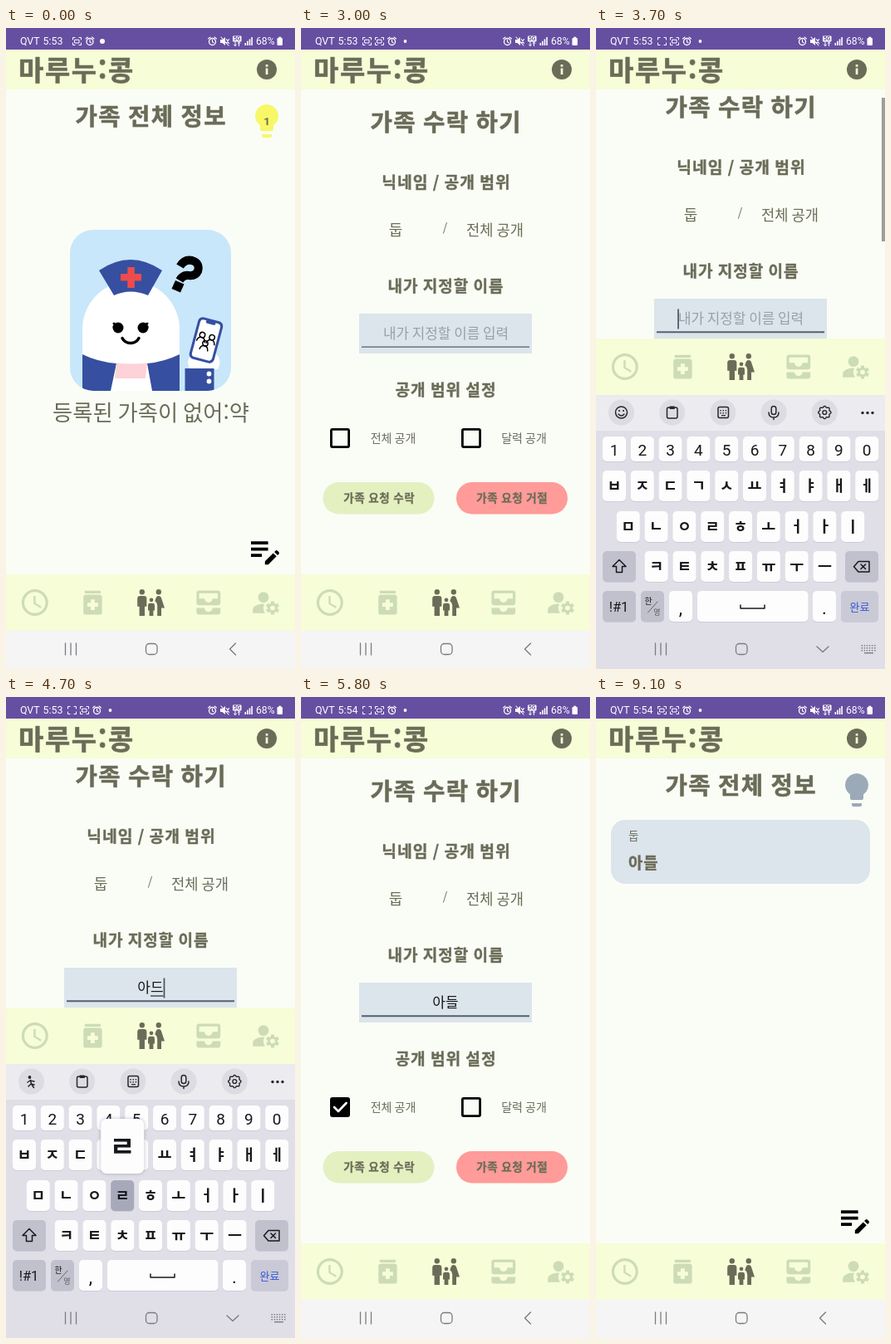
An HTML page with a canvas that plays this animation: 348 px wide and 772 px high, repeating every 9.2 s.

```html
<!DOCTYPE html>
<html lang="ko">
<head>
<meta charset="utf-8">
<title>가족 정보</title>
<style>
html, body { margin: 0; width: 100%; height: 100%; overflow: hidden; background: #fafdf6; }
canvas { display: block; width: 348px; height: 772px; }
</style>
</head>
<body>
<canvas id="stage"></canvas>
<script>
const W = 348, H = 772, LOOP = 9200, STEP = 100;
const KR = '"Noto Sans CJK KR", "Noto Sans CJK", sans-serif';
const LATIN = 'Roboto, "Noto Sans CJK KR", sans-serif';
const INK = '#6b6c58', PAGE = '#fafdf6', LIME = '#f6fdd7', PALE = '#cddcb6';
const FIELD = '#dce4ec', BLUE = '#364fa0', KEY_DARK = '#c0c1cd', KEY_INK = '#17181b';
const NAV_LIFT = 284;

const canvas = document.getElementById('stage');
const c = canvas.getContext('2d');
const ratio = window.devicePixelRatio || 1;
canvas.width = W * ratio;
canvas.height = H * ratio;

// ---------- helpers ----------
const clamp = v => Math.max(0, Math.min(1, v));
const easeOut = p => 1 - (1 - clamp(p)) ** 2;
const within = (t, a, b) => t >= a && t < b;

function rect(x, y, w, h, color, r = 0) {
  c.fillStyle = color;
  c.beginPath();
  c.roundRect(x, y, w, h, r);
  c.fill();
}
function dot(x, y, r, color) {
  c.fillStyle = color;
  c.beginPath();
  c.arc(x, y, r, 0, 7);
  c.fill();
}
function ring(x, y, r, color, width) {
  c.beginPath();
  c.arc(x, y, r, 0, 7);
  c.strokeStyle = color;
  c.lineWidth = width;
  c.stroke();
}
function line(d, color, width) {
  c.strokeStyle = color;
  c.lineWidth = width;
  c.stroke(new Path2D(d));
}
function fill(d, color) {
  c.fillStyle = color;
  c.fill(new Path2D(d));
}
function icon(d, x, y, scale, color) {
  c.save();
  c.translate(x, y);
  c.scale(scale, scale);
  c.fillStyle = color;
  c.fill(new Path2D(d), 'evenodd');
  c.restore();
}
function text(s, x, cy, size, color = INK, align = 'center', font = KR, weight = 400) {
  c.font = `${weight} ${size}px ${font}`;
  c.textAlign = align;
  c.fillStyle = color;
  c.fillText(s, x, cy + size * 0.35);
}
// heavy, rounded, slightly tracked lettering
function heavy(s, x, cy, size, align = 'center') {
  const em = size * 0.94, gap = em * 0.05;
  c.letterSpacing = `${gap}px`;
  const left = x + (align === 'center' ? gap / 2 : 0);
  text(s, left, cy, em, INK, align, KR, 700);
  c.strokeStyle = INK;
  c.lineWidth = em * 0.02;
  c.strokeText(s, left, cy + em * 0.35);
  c.letterSpacing = '0px';
}

// ---------- status bar ----------
function brackets(x, full) {
  line(`M${x} 14v-2.5h2.5M${x + 7.5} 11.5h2.5v2.5M${x + 10} 18v2.5h-2.5M${x + 2.5} 20.5h-2.5v-2.5`, '#fff', 1);
  if (full) {
    c.strokeStyle = '#fff';
    c.strokeRect(x + 2.5, 14.2, 5, 3.8);
  }
}
function alarm(x) {
  ring(x, 16.5, 4, '#fff', 1.3);
  line(`M${x} 14.3v2.5l1.6 1M${x - 5} 13l2.5-2M${x + 5} 13l-2.5-2`, '#fff', 1.1);
}
function statusBar(t) {
  rect(0, 0, W, 26, '#664fa1');
  text('QVT', 17, 16, 12.4, '#fff', 'left', LATIN);
  text(t < 5400 ? '5:53' : '5:54', 44.5, 16, 12.4, '#fff', 'left', LATIN);
  const blink = Math.floor(t / 500) % 2 === 0;
  if (t < 200) {
    brackets(80.5, blink);
    alarm(101);
    dot(116, 16, 3, '#fff');
  } else {
    brackets(74.5, blink);
    brackets(89.5, true);
    alarm(109.5);
    dot(125.5, 16, 1.9, '#fff');
  }
  alarm(248.5);
  fill('M258 14h2.5l3.5-3v10l-3.5-3H258z', '#fff');
  line('M265.5 13.5l3 5M268.5 13.5l-3 5M259 11l9 10', '#fff', 1.1);
  rect(273, 9.5, 10.5, 7, '#fff', 1);
  text('5G', 278.2, 13, 6.5, '#664fa1', 'center', LATIN, 700);
  c.globalAlpha = within(t, 7700, 8700) ? 0.45 : 1;
  line('M276 17v4.5M274.5 20l1.5 1.5 1.5-1.5M280.5 21.5v-4.5M279 18.5l1.5-1.5 1.5 1.5', '#fff', 1);
  c.globalAlpha = 1;
  for (let i = 0; i < 4; i++) rect(287.5 + i * 2.6, 18 - i * 2.3, 1.6, 3 + i * 2.3, '#fff');
  text('68%', 301, 16, 12.2, '#fff', 'left', LATIN);
  rect(326.5, 12, 6.5, 9, '#fff', 1.2);
  rect(328.3, 10.7, 3, 2, '#fff');
}

function header() {
  rect(0, 26, W, 48, LIME);
  heavy('마루누:콩', 15, 51, 35, 'left');
  dot(314, 50, 12, INK);
  rect(312.7, 48.5, 2.7, 7.5, LIME);
  rect(312.7, 44, 2.7, 2.7, LIME);
}

// ---------- bottom navigation ----------
const CLOCK = 'M12 2a10 10 0 1 0 0 20a10 10 0 1 0 0-20zM12 4a8 8 0 1 1 0 16a8 8 0 1 1 0-16zM11 7h1.5v5.25l4.5 2.67-.75 1.23L11 13z';
const PILLS = 'M6 3h12v2H6zM17 6H7a2 2 0 0 0-2 2v11a2 2 0 0 0 2 2h10a2 2 0 0 0 2-2V8a2 2 0 0 0-2-2zM16 15h-2.5v2.5h-3V15H8v-3h2.5V9.5h3V12H16z';
const FAMILY = 'M16 4a2 2 0 1 1 4 0a2 2 0 1 1-4 0zM20 22v-6h2.5l-2.54-7.63A2 2 0 0 0 18.06 7h-.12a2 2 0 0 0-1.9 1.37l-.86 2.58A3.5 3.5 0 0 1 17 14v8zM11 10a1.5 1.5 0 1 1 3 0a1.5 1.5 0 1 1-3 0zM3.5 4a2 2 0 1 1 4 0a2 2 0 1 1-4 0zM7.5 22v-7H9V9a2 2 0 0 0-2-2H4a2 2 0 0 0-2 2v6h1.5v7zM14 22v-4h1v-4a1.5 1.5 0 0 0-1.5-1.5h-2A1.5 1.5 0 0 0 10 14v4h1v4z';
const INBOX = 'M19 3H5a2 2 0 0 0-2 2v7a2 2 0 0 0 2 2h14a2 2 0 0 0 2-2V5a2 2 0 0 0-2-2zM19 9h-4a3 3 0 0 1-6 0H5V5h14zM15 16h6v3a2 2 0 0 1-2 2H5a2 2 0 0 1-2-2v-3h6a3 3 0 0 0 6 0z';
const PERSON = 'M6 8a4 4 0 1 1 8 0a4 4 0 1 1-8 0zM10.67 13.02C8 12.8 5.4 13.6 3.39 14.82A3 3 0 0 0 2 17.35V20h9.26A7 7 0 0 1 10.67 13.02z';
const BULB = 'M9 20h6v1a1 1 0 0 1-1 1h-4a1 1 0 0 1-1-1zM12 2a7 7 0 0 0-4 12.74V17a1 1 0 0 0 1 1h6a1 1 0 0 0 1-1v-2.26A7 7 0 0 0 12 2z';
const NOTE = 'M3 10h11v2H3zM3 6h11v2H3zM3 14h7v2H3zM18.01 12.87l.71-.71a1 1 0 0 1 1.41 0l.71.71a1 1 0 0 1 0 1.41l-.71.71zM17.3 13.58l-5.3 5.3V21h2.12l5.3-5.3z';

function gear(x, y) {
  c.save();
  c.translate(x, y);
  c.fillStyle = PALE;
  for (let i = 0; i < 6; i++) {
    c.fillRect(-2, -8, 4, 5);
    c.rotate(Math.PI / 3);
  }
  c.restore();
  ring(x, y, 4.5, PALE, 3);
}
function bottomNav(dy) {
  c.save();
  c.translate(0, dy);
  rect(0, 658, W, 68, LIME);
  icon(CLOCK, 15.6, 672.8, 1.6, PALE);
  icon(PILLS, 85.2, 673, 1.6, PALE);
  icon(FAMILY, 155, 672.8, 1.6, INK);
  icon(INBOX, 224.6, 672.8, 1.6, PALE);
  icon(PERSON, 294, 672.8, 1.6, PALE);
  gear(321, 698.5);
  c.restore();
}
function systemBar(k) {
  const open = k > 0.5, gray = '#7b7c80';
  rect(0, 725.5, W, 46.5, open ? '#e0dfe7' : '#f5f5f5');
  line('M71.5 741v14M78 741v14M84.5 741v14', gray, 1.3);
  c.beginPath();
  c.roundRect(168.5, 741.5, 13.5, 13, 4);
  c.stroke();
  line(open ? 'M266 745l7 6.5 7-6.5' : 'M276.5 741l-7 7 7 7', gray, 1.4);
  if (!open) return;
  for (let i = 0; i < 18; i++) rect(319.5 + (i % 6) * 3.1, 743 + Math.floor(i / 6) * 3, 1.5, 1.5, gray);
  rect(323, 752, 11, 1.4, gray);
}

// ---------- family page ----------
function nurse() {
  c.save();
  c.beginPath();
  c.roundRect(77, 243, 194, 194, 28);
  c.clip();
  rect(77, 243, 194, 194, '#c8e7fa');
  fill('M92 437V363a58.5 58.5 0 0 1 117 0V437z', '#fff');
  fill('M92 393Q110 402 133 404L126 437H92zM209 393Q191 402 170 404L176 437H209z', BLUE);
  fill('M133 403.5Q151 405.5 170 403.5L168 422H131z', '#fdd2d8');
  fill('M112 292Q150 266 188 292L171 322Q150 313 130 322z', BLUE);
  rect(138, 296, 25, 8.5, '#ee4b4b');
  rect(146.3, 288, 8.5, 25, '#ee4b4b');
  dot(135, 361, 6.5, '#000');
  dot(165, 361, 6.5, '#000');
  line('M130 356l2 2M130 360l1 1M170 356l-2 2M170 360l-1 1', '#000', 3);
  line('M140 373.5Q143 379.5 150 379.5Q157 379.5 160 373.5', '#000', 3.5);
  // question mark
  c.lineCap = 'butt';
  line('M209.5 287Q215 278 224 280Q234 283 231 293Q228 299 220 298Q213 297 209 304', '#000', 10);
  fill('M204 304l10.5 4.5-4.5 10-10.5-4.5z', '#000');
  c.lineCap = 'round';
  // arm and phone
  fill('M221 411Q215 396 228 392L252 391Q261 400 255 411z', '#fff');
  rect(215.5, 410, 35, 27, BLUE);
  dot(244.5, 416.5, 2.9, '#fff');
  dot(244.5, 425.5, 2.9, '#fff');
  c.translate(241, 376);
  c.rotate(0.26);
  rect(-15.5, -26, 31, 52, BLUE, 6);
  rect(-12.5, -23, 25, 46, '#fff', 4);
  rect(-6, -24, 12, 4, BLUE, 2);
  for (const [x, y] of [[-6, -5], [6, -5], [0, 4]]) {
    ring(x, y, 3.2, '#000', 1.5);
    line(`M${x - 5} ${y + 8}q1-5 5-5t5 5`, '#000', 1.5);
  }
  c.restore();
}
function familyPage(registered) {
  rect(0, 74, W, 584, PAGE);
  heavy('가족 전체 정보', 174, 107, 30.5);
  icon(BULB, 290, 88, 2, registered ? '#9ca9b9' : '#f8f766');
  icon(NOTE, 289.4, 607, 1.87, '#000');
  if (registered) {
    rect(18, 148, 312, 77, FIELD, 17);
    text('둡', 39, 167, 13.5, INK, 'left');
    heavy('아들', 39, 200, 20, 'left');
  } else {
    text('1', 314, 112.5, 13.5, INK, 'center', LATIN, 700);
    nurse();
    text('등록된 가족이 없어:약', 174.5, 464, 26.3);
  }
}

// ---------- request page ----------
const PRESSES = [['ㅇ', 3800], ['ㅏ', 4100], ['ㄷ', 4300], ['ㅡ', 4500], ['ㄹ', 4700]];
const TYPED = ['', 'ㅇ', '아', '앋', '아드', '아들'];

function checkbox(x, y, on) {
  if (on) {
    rect(x, y, 24, 24, '#000', 3);
    line(`M${x + 5} ${y + 12}l5 5 9.5-10`, '#fff', 2.6);
  } else {
    c.strokeStyle = '#000';
    c.lineWidth = 2.8;
    c.beginPath();
    c.roundRect(x + 1.4, y + 1.4, 21.2, 21.2, 1.5);
    c.stroke();
  }
}
function nameField(t) {
  const focused = t >= 3400;
  const count = PRESSES.filter(p => t >= p[1] + STEP).length;
  const value = TYPED[count];
  rect(70, 344, 208, 48, FIELD);
  rect(73, focused ? 383.3 : 383.6, 202, focused ? 2 : 1.1, '#55606f');
  if (value) text(value, 174, 368.5, 17, '#15171a');
  else text('내가 지정할 이름 입력', 174.5, 368.5, 16.9, '#98a1aa');
  if (!within(t, 3500, 5300)) return;
  const half = value ? c.measureText(value).width / 2 : 75;
  if (value) {
    const last = c.measureText(value.slice(-1)).width;
    rect(174 + half - last, 377.5, last, 1.1, '#15171a');
  }
  rect(value ? 174 + half : 98.2, 356.5, 1.7, 24, '#4a5260');
}
function requestPage(t, k) {
  rect(0, 74, W, 584, PAGE);
  c.save();
  c.translate(0, -18 * k);
  heavy('가족 수락 하기', 174, 114, 30.5);
  heavy('닉네임 / 공개 범위', 174.5, 186, 20.5);
  text('둡', 114, 243.5, 18);
  text('/', 173.5, 240, 14);
  text('전체 공개', 233.5, 243.5, 17.7);
  heavy('내가 지정할 이름', 174, 311, 20.3);
  nameField(t);
  heavy('공개 범위 설정', 174, 436.5, 20.4);
  if (within(t, 5500, 5800)) dot(47, 494, 14 + (t - 5400) / 20, `rgba(0,0,0,${0.16 - (t - 5500) / 2500})`);
  checkbox(35, 482, t >= 5600);
  checkbox(193, 482, false);
  text('전체 공개', 111, 494, 14);
  text('달력 공개', 268.5, 494, 14);
  rect(26.5, 547, 134, 38.5, '#e4f0c0', 19);
  rect(187, 547, 134, 38.5, '#ff9b98', 19);
  if (within(t, 6700, 7000)) {
    c.save();
    c.beginPath();
    c.roundRect(26.5, 547, 134, 38.5, 19);
    c.clip();
    dot(93, 566, 25 + (t - 6700) / 4, `rgba(107,108,88,${0.2 - (t - 6700) / 2200})`);
    c.restore();
  }
  heavy('가족 요청 수락', 94, 566, 14.4);
  heavy('가족 요청 거절', 254, 566, 14.4);
  c.restore();
  const bar = k > 0.5 ? clamp((4300 - t) / 300) : 0;
  if (bar) rect(344, 84, 4, 173, `rgba(157,158,155,${bar})`);
}

// ---------- keyboard ----------
const ROWS = [
  ['1234567890', 22, 492, 30],
  ['ㅂㅈㄷㄱㅅㅛㅕㅑㅐㅔ', 22, 533, 37],
  ['ㅁㄴㅇㄹㅎㅗㅓㅏㅣ', 38.8, 582, 37],
  ['ㅋㅌㅊㅍㅠㅜㅡ', 72.7, 630, 37]
];
function keyCap(x, y, w, h, color = '#fdfdfe') {
  rect(x, y + 1, w, h, '#cdccd5', 5);
  rect(x, y, w, h, color, 5);
}
function toolbar(t) {
  const ink = '#26272b';
  for (let i = 0; i < 5; i++) dot(30.5 + i * 61.2, 463, 15.5, '#dddce3');
  if (t < 3900) {
    ring(30.5, 463, 7, ink, 1.5);
    dot(28, 461, 1.1, ink);
    dot(33, 461, 1.1, ink);
    line('M27 465q3.5 4 7 0', ink, 1.4);
  } else {
    dot(28.5, 458, 1.9, ink);
    line('M29.5 461.5l1 4.5 3.5 1M30.5 466l3 4.5M30 466l-3 3M26 464l3-2 5 1', ink, 1.5);
  }
  c.strokeStyle = ink;
  c.lineWidth = 1.5;
  c.beginPath();
  c.roundRect(85.5, 457, 12.5, 13, 2);
  c.roundRect(147, 456.5, 12.5, 13, 2);
  c.stroke();
  rect(88.5, 455.5, 6.5, 3.5, ink, 1);
  for (let i = 0; i < 6; i++) rect(149.3 + (i % 3) * 3.2, 460 + Math.floor(i / 3) * 3, 1.4, 1.4, ink);
  rect(151, 466, 5, 1.2, ink);
  c.beginPath();
  c.roundRect(211.2, 455.5, 5.6, 10, 2.8);
  c.stroke();
  line('M208 463q0 6 6 6t6-6M214 469v2.5', ink, 1.5);
  ring(275.3, 463, 2.4, ink, 1.4);
  c.beginPath();
  for (let i = 0; i <= 64; i++) {
    const a = i / 64 * Math.PI * 2, r = 6.9 + 0.8 * Math.cos(a * 8);
    c.lineTo(275.3 + Math.cos(a) * r, 463 + Math.sin(a) * r);
  }
  c.stroke();
  for (const x of [321, 327, 333]) dot(x, 463.5, 1.7, ink);
}
function keyboard(t, k) {
  c.save();
  c.translate(0, 330 * (1 - k));
  rect(0, 442, W, 330, '#e0dfe7');
  rect(0, 442, W, 43, '#ebebf0');
  toolbar(t);
  const press = PRESSES.find(p => within(t, p[1], p[1] + 200));
  let popup = null;
  for (const [chars, first, y, h] of ROWS) {
    [...chars].forEach((ch, i) => {
      const x = first + i * 33.8, hit = press && press[0] === ch;
      keyCap(x - 14, y, 28, h, hit ? '#a7a9bb' : undefined);
      if (ch <= '9') text(ch, x, y + h / 2 + 1, 19, KEY_INK, 'center', LATIN);
      else text(ch, x, y + h / 2 + 0.5, 18.5, KEY_INK, 'center', KR, 700);
      if (hit) popup = [ch, x, y];
    });
  }
  keyCap(8, 630, 40, 37, KEY_DARK);
  line('M28 640.5l8 8h-4.5v7h-7v-7h-4.5z', KEY_INK, 1.5);
  keyCap(300, 630, 40, 37, KEY_DARK);
  line('M316 642.5h13v12.5h-13l-5.5-6.2zM319 646l5.5 5.5M324.5 646l-5.5 5.5', KEY_INK, 1.5);
  keyCap(8, 678, 40, 37, KEY_DARK);
  text('!#1', 27.5, 697, 16.5, KEY_INK, 'center', LATIN);
  keyCap(54, 678, 28, 37, KEY_DARK);
  text('한', 63, 690.5, 10, KEY_INK);
  text('영', 73.5, 704, 9, '#5a5c64');
  line('M62.5 704l11.5-13', '#5a5c64', 0.9);
  keyCap(88, 678, 28, 37);
  text(',', 102, 698, 22, KEY_INK, 'center', LATIN);
  keyCap(122, 678, 133.5, 37);
  line('M174 695v4h29v-4', KEY_INK, 1.5);
  keyCap(261, 678, 28, 37);
  text('.', 275, 698, 22, KEY_INK, 'center', LATIN);
  keyCap(295, 678, 45, 37, within(t, 5000, 5200) ? '#a7a9bb' : '#cac9d6');
  text('완료', 317.5, 697, 13, '#3458d8');
  if (popup) {
    const [ch, x, y] = popup;
    const left = Math.max(4, Math.min(W - 56, x - 26));
    c.shadowColor = 'rgba(40,42,60,.3)';
    c.shadowBlur = 4 * ratio;
    rect(left, y - 74, 52, 66, '#fdfdfe', 7);
    c.shadowColor = 'transparent';
    text(ch, left + 26, y - 40, 34, KEY_INK, 'center', KR, 700);
  }
  c.restore();
}

// ---------- timeline ----------
function fade(amount, page) {
  c.globalAlpha = amount;
  page();
  c.globalAlpha = 1;
}
function draw(t) {
  const k = t < 4900 ? easeOut((t - 3300) / 400) : 1 - easeOut((t - 4900) / 400);
  c.setTransform(ratio, 0, 0, ratio, 0, 0);
  c.lineCap = c.lineJoin = 'round';
  rect(0, 0, W, H, PAGE);
  c.save();
  c.beginPath();
  c.rect(0, 74, W, 584 - NAV_LIFT * k);
  c.clip();
  if (t < 2000) familyPage(false);
  else if (t < 2200) {
    familyPage(false);
    fade((t - 1900) / 300, () => requestPage(t, 0));
  } else if (t < 7200) requestPage(t, k);
  else {
    if (t < 7500) requestPage(t, 0);
    fade(clamp((t - 7100) / 400), () => familyPage(true));
  }
  c.restore();
  bottomNav(-NAV_LIFT * k);
  if (k > 0) keyboard(t, k);
  systemBar(k);
  header();
  statusBar(t);
}
function tick() {
  const t = performance.now() % LOOP;
  draw(Math.floor(t / STEP) * STEP);
  requestAnimationFrame(tick);
}
tick();
</script>
</body>
</html>
```
